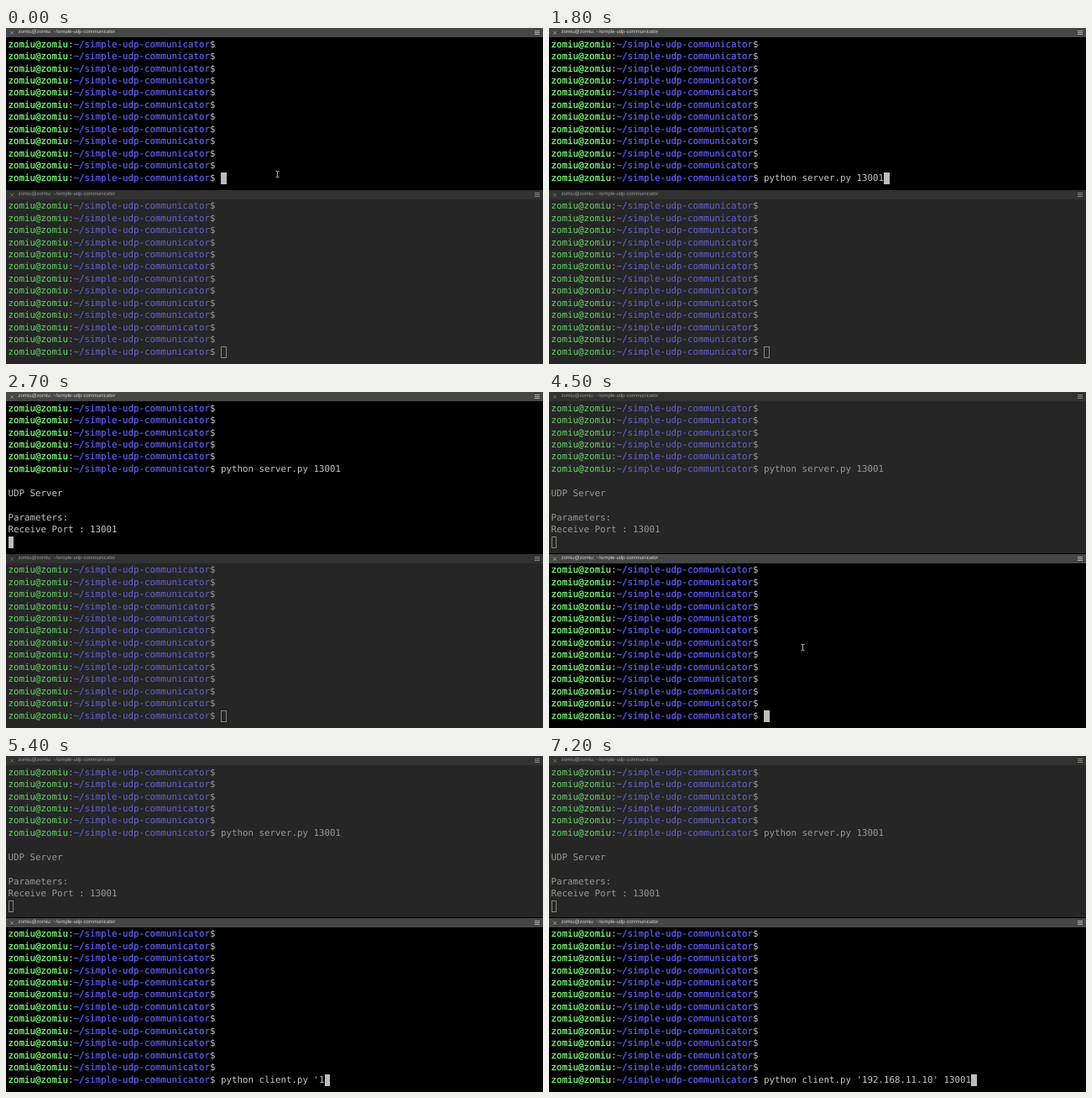
Recreate the animation shown at these times as an HTML page. Size 640 by 400 pixels, loop 8 s.

```html
<!DOCTYPE html>
<html lang="en">
<head>
<meta charset="utf-8">
<title>Two terminal panes</title>
<style>
  html, body { margin: 0; width: 100%; height: 100%; overflow: hidden; background: #000; }
  #stage { position: relative; width: 640px; height: 400px; overflow: hidden; text-rendering: geometricPrecision; }
  .pane {
    --bg: #262626; --bar: #323232; --title: #989898; --icon: #858585;
    --user: #63c765; --path: #6660c9; --text: #989898; --weight: .1px;
    position: absolute; left: 0; width: 640px; background: var(--bg); color: var(--text);
  }
  .pane.active {
    --bg: #000; --bar: #464646; --title: #d4d4d4; --icon: #b0b0b0;
    --user: #78f976; --path: #665ffc; --text: #c6c6c6; --weight: .32px;
  }
  .bar {
    position: absolute; top: 0; left: 0; width: 640px; height: 11px;
    background: var(--bar); color: var(--title);
    font: 6px/11px "Liberation Sans", Arial, sans-serif; white-space: pre;
  }
  .bar span { position: absolute; left: 14.5px; top: 0; }
  .bar svg { position: absolute; left: 0; top: 0; stroke: var(--icon); fill: none; }
  .line {
    position: absolute; left: 2.5px; height: 14.47px; white-space: pre;
    font: 10.8px/14.47px "DejaVu Sans Mono", monospace;
  }
  .user { color: var(--user); -webkit-text-stroke: var(--weight) var(--user); }
  .path { color: var(--path); -webkit-text-stroke: calc(var(--weight) * .6) var(--path); }
  .cursor {
    position: absolute; width: 6.5px; height: 14.4px; box-sizing: border-box;
    border: 1px solid #858585;
  }
  .active .cursor { background: #bdbdbd; border: 0; }
  #mouse { position: absolute; fill: none; stroke: #b4b4b4; }
</style>
</head>
<body>
<div id="stage">
  <div class="pane" id="top"></div>
  <div class="pane" id="bottom"></div>
  <svg id="mouse" width="7" height="10"><path d="M1.5 1.5H3L3.5 2L4 1.5H5.5M3.5 2V8M1.5 8.5H3L3.5 8L4 8.5H5.5"/></svg>
</div>
<script>
const LOOP = 8000, STEP = 900, PITCH = 14.47, CHAR = 6.5, LEFT = 2.5;
const HOST = 'zomiu@zomiu', DIR = '~/simple-udp-communicator';
const PROMPT_LEN = HOST.length + DIR.length + 3;
const SERVER = 'python server.py 13001';
const CLIENT = "python client.py '192.168.11.10' 13001";
const OUTPUT = ['', 'UDP Server', '', 'Parameters:', 'Receive Port : 13001', ''];

const prompt = (cmd = '') =>
  `<span class="user">${HOST}</span>:<span class="path">${DIR}</span>$ ${cmd}`;

function makePane(id, y, height, rows, firstRow) {
  const el = document.getElementById(id);
  el.style.cssText = `top:${y}px;height:${height}px`;
  const lines = Array.from({ length: rows }, (_, i) =>
    `<div class="line" style="top:${firstRow + i * PITCH}px"></div>`).join('');
  el.innerHTML = `<div class="bar"><svg width="640" height="11">
    <path stroke-width=".7" d="M5 3.8l4 4m0-4l-4 4"/>
    <path d="M630 3.5h6m-6 2h6m-6 2h6"/></svg><span>${HOST}: ${DIR}</span></div>
    ${lines}<div class="cursor"></div>`;
  const lineEls = el.querySelectorAll('.line');
  const cursor = el.querySelector('.cursor');
  cursor.style.top = firstRow + (rows - 1) * PITCH + 'px';

  return (active, cmd, output = []) => {
    el.classList.toggle('active', active);
    const cmdRow = rows - 1 - output.length;
    lineEls.forEach((line, i) => {
      line.innerHTML = i > cmdRow ? output[i - cmdRow - 1] : prompt(i === cmdRow ? cmd : '');
    });
    const col = output.length ? 0 : PROMPT_LEN + cmd.length;
    cursor.style.left = LEFT + col * CHAR + 'px';
  };
}

const drawTop = makePane('top', 0, 192, 12, 12.6);
const drawBottom = makePane('bottom', 192.5, 207.5, 13, 12.6);
const mouse = document.getElementById('mouse');

// Characters typed and pointer position for each step of the loop
const typedServer = [0, 13, 22];
const typedClient = [0, 0, 0, 0, 0, 0, 19, 38, 38];
const pointer = { 0: [320, 169], 4: [299, 299], 5: [299, 299] };

function draw(step) {
  const swapped = step >= 5, running = step >= 3;
  drawTop(!swapped, SERVER.slice(0, typedServer[step] ?? SERVER.length), running ? OUTPUT : []);
  drawBottom(swapped, CLIENT.slice(0, typedClient[step]));
  const pos = pointer[step];
  mouse.style.display = pos ? '' : 'none';
  if (pos) [mouse.style.left, mouse.style.top] = pos.map(v => v + 'px');
}

let shown = -1;
function tick() {
  const step = Math.floor(performance.now() % LOOP / STEP);
  if (step !== shown) draw(shown = step);
  requestAnimationFrame(tick);
}
tick();
</script>
</body>
</html>
```
